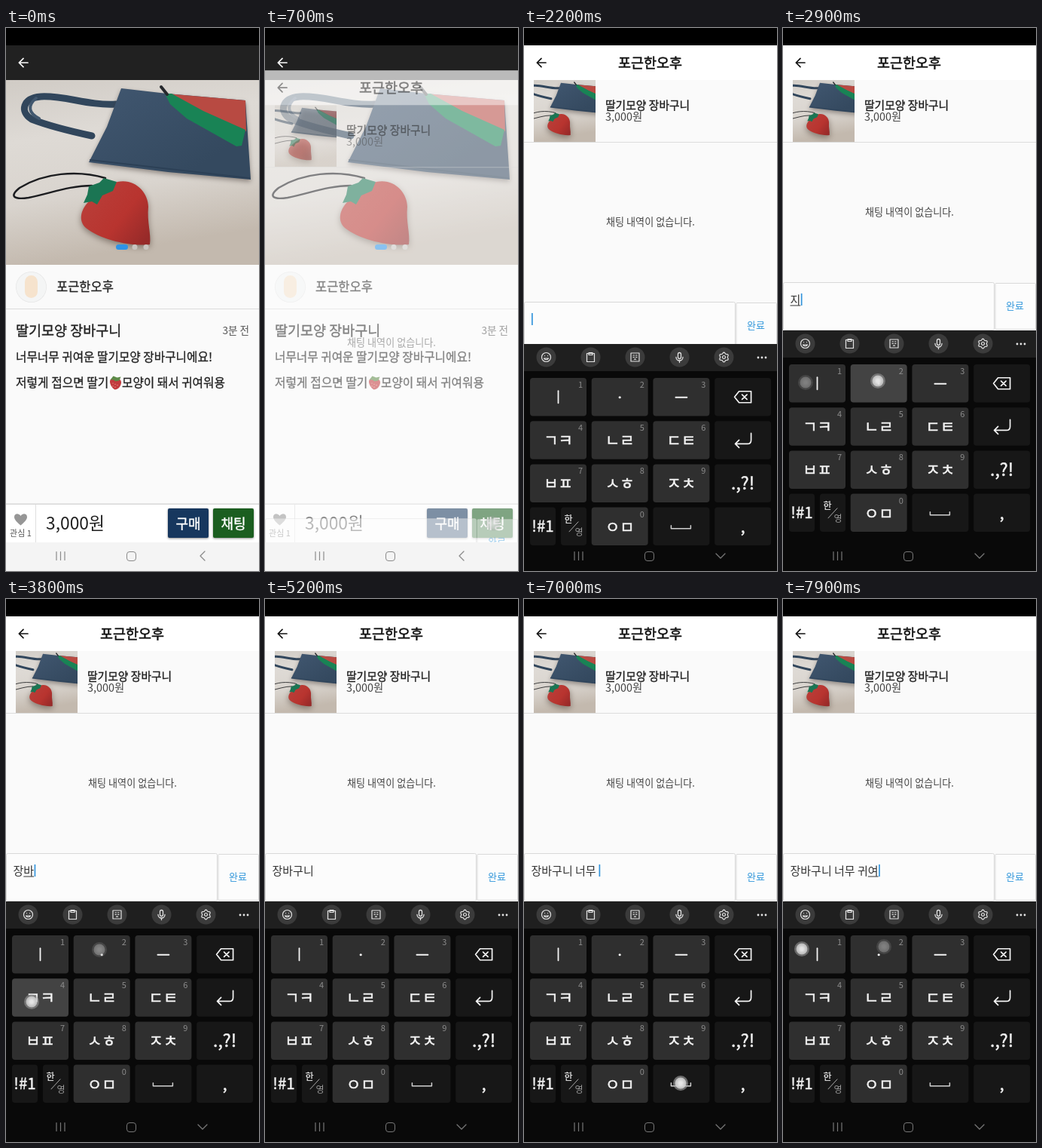
An HTML page with a canvas for the animation above (8 s loop, 336 by 720 pixels).

```html
<!DOCTYPE html>
<html lang="ko">
<head>
<meta charset="utf-8">
<title>장바구니 채팅</title>
<style>
html, body { margin: 0; width: 100%; height: 100%; overflow: hidden; background: #fafafa; }
canvas { display: block; width: 336px; height: 720px; }
</style>
</head>
<body>
<canvas id="stage"></canvas>
<script>
const W = 336, H = 720, LOOP = 8000;
const FONT = '"Noto Sans CJK KR", "Noto Sans CJK", "Noto Sans", sans-serif';
const SELLER = '포근한오후', ITEM = '딸기모양 장바구니', PRICE = '3,000원';
const canvas = document.getElementById('stage');
const ctx = canvas.getContext('2d');
const dpr = window.devicePixelRatio || 1;
canvas.width = W * dpr;
canvas.height = H * dpr;

// press time, x, y, text after the press ("|" starts the part being composed)
const TAPS = [
  [2480, 205, 590, '|ㅈ'],
  [2680, 30, 470, '|지'],
  [2880, 126, 468, '|자'],
  [3070, 130, 634, '|장'],
  [3260, 32, 588, '장|ㅂ'],
  [3430, 28, 470, '장|비'],
  [3590, 124, 465, '장|바'],
  [3770, 34, 534, '장|박'],
  [3980, 208, 472, '장바|그'],
  [4160, 128, 466, '장바|구'],
  [4320, 130, 530, '장바|군'],
  [4480, 28, 470, '장바구|니'],
  [4620, 208, 642, '장바구니|'],
  [5280, 208, 642, '장바구니 |'],
  [5500, 130, 530, '장바구니 |ㄴ'],
  [5730, 128, 466, '장바구니 |ㄴㆍ'],
  [5960, 25, 473, '장바구니 |너'],
  [6120, 134, 640, '장바구니 |넝'],
  [6300, 134, 640, '장바구니 |넘'],
  [6480, 208, 472, '장바구니 너|므'],
  [6640, 128, 466, '장바구니 너|무'],
  [6780, 208, 642, '장바구니 너무|'],
  [6900, 208, 642, '장바구니 너무 |'],
  [7020, 34, 532, '장바구니 너무 |ㄱ'],
  [7130, 208, 470, '장바구니 너무 |그'],
  [7240, 130, 464, '장바구니 너무 |구'],
  [7350, 26, 468, '장바구니 너무 |귀'],
  [7450, 132, 640, '장바구니 너무 |귕'],
  [7560, 134, 462, '장바구니 너무 귀|ㅇㆍ'],
  [7680, 134, 461, '장바구니 너무 귀|ㅇᆢ'],
  [7820, 25, 464, '장바구니 너무 귀|여']
];
const EDIT_LAG = 60;
const KEYS = ['ㅣ', 'ㆍ', 'ㅡ', 'del', 'ㄱㅋ', 'ㄴㄹ', 'ㄷㅌ', 'enter',
  'ㅂㅍ', 'ㅅㅎ', 'ㅈㅊ', '.,?!', 'mode', 'ㅇㅁ', 'space', ','];

const clamp = v => Math.max(0, Math.min(1, v));

function box(x, y, w, h, fill, r = 0, stroke) {
  ctx.beginPath();
  ctx.roundRect(x, y, w, h, r);
  if (fill) { ctx.fillStyle = fill; ctx.fill(); }
  if (stroke) { ctx.strokeStyle = stroke; ctx.lineWidth = 1; ctx.stroke(); }
}

function disc(x, y, r, fill) {
  ctx.beginPath();
  ctx.arc(x, y, r, 0, 7);
  ctx.fillStyle = fill;
  ctx.fill();
}

function shape(d, fill, stroke, width = 1) {
  const p = new Path2D(d);
  if (fill) { ctx.fillStyle = fill; ctx.fill(p); }
  if (stroke) {
    ctx.strokeStyle = stroke;
    ctx.lineWidth = width;
    ctx.lineCap = ctx.lineJoin = 'round';
    ctx.stroke(p);
  }
}

// Draws a shape whose path is given around (0, 0)
function icon(x, y, d, color, width = 1.5, fill) {
  ctx.save();
  ctx.translate(x, y);
  shape(d, fill, color, width);
  ctx.restore();
}

// y is the visual middle of the line, bold a thin outline for a medium weight
function text(s, x, y, size, color, bold = 0, align = 'left') {
  ctx.font = `400 ${size}px ${FONT}`;
  ctx.textAlign = align;
  ctx.fillStyle = color;
  ctx.fillText(s, x, y + size * 0.37);
  if (!bold) return;
  ctx.strokeStyle = color;
  ctx.lineWidth = bold;
  ctx.strokeText(s, x, y + size * 0.37);
}

function shadow(color, blur, y, paint) {
  ctx.save();
  ctx.shadowColor = color;
  ctx.shadowBlur = blur;
  ctx.shadowOffsetY = y;
  paint();
  ctx.restore();
}

function gradient(x0, y0, x1, y1, ...colors) {
  const g = ctx.createLinearGradient(x0, y0, x1, y1);
  colors.forEach((c, i) => g.addColorStop(i / (colors.length - 1), c));
  return g;
}

function backArrow(color) {
  icon(23, 46, 'M6 0H-5.5M0 -5.7L-5.7 0L0 5.7', color, 1.7);
}

function photo() {
  box(0, 0, W, 245, gradient(0, 0, 40, 245, '#d0cbc5', '#dedad5', '#d9d4ce', '#c3b9ae'));
  shape('M146 32C108 34 78 20 46 22C22 24 18 42 34 52C60 62 86 68 114 74', null, '#31465c', 9);
  shape('M40 24C28 34 30 44 44 51', null, '#42586f', 4);
  shadow('rgba(70,60,55,.5)', 6, 3, () =>
    shape('M153 11L214 18L318 27L325 132L215 122L110 109L134 62Z', gradient(150, 0, 230, 130, '#40566f', '#34495f')));
  shape('M112 106L323 130', null, '#2c4056', 2);
  shape('M213 18L318 27L319 68L262 42Z', '#b84a42');
  shape('M211 18L220 18L262 41L318 66L313 87L306 88L240 51L218 32Z', '#198355');
  shape('M206 9L214 19', null, '#25282c', 4);
  shape('M132 130C95 119 50 123 18 143C4 154 10 159 30 156C60 150 84 140 114 140', null, '#1c1d20', 2.5);
  shadow('rgba(70,55,45,.55)', 8, 3, () =>
    shape('M111 160C124 149 136 138 148 135C172 130 189 150 189 168C187 188 193 204 191 218C166 221 126 212 106 196C95 186 100 170 111 160Z',
      gradient(115, 160, 185, 215, '#b93c37', '#b8342f', '#962a29')));
  shape('M110 141L124 136L130 130L147 135L142 147L128 153L121 165L114 161L103 163L108 152Z', '#1b7553');
}

function button(x, label, color) {
  shadow('rgba(0,0,0,.45)', 3, 1, () => box(x, 637, 54, 39, color, 2));
  text(label, x + 27, 657, 18, '#fff', 0.4, 'center');
}

function itemPage() {
  box(0, 23, W, 659, '#fafafa');
  box(0, 23, W, 46, '#212121');
  backArrow('#fff');
  ctx.save();
  ctx.translate(0, 69);
  photo();
  ctx.restore();
  box(146, 287, 16, 7, '#2f93e6', 3.5);
  disc(171, 290.5, 3.5, '#c9c4c0');
  disc(186, 290.5, 3.5, '#c9c4c0');

  disc(33.5, 343.5, 20.5, '#e6e6e6');
  disc(33.5, 343.5, 19.8, '#f4f5f5');
  box(25, 328, 17, 30, '#f6e3cd', 8.5);
  text(SELLER, 67, 343, 16.5, '#222', 0.3);
  box(0, 372, W, 1, '#dcdcdc');
  text(ITEM, 13, 401, 18.5, '#222', 0.35);
  text('3분 전', 323, 401, 13.6, '#555', 0, 'right');
  text('너무너무 귀여운 딸기모양 장바구니에요!', 13, 436, 15.7, '#222', 0.3);
  text('저렇게 접으면 딸기', 13, 470.5, 15.8, '#222', 0.3);
  icon(145.5, 470.5, 'M-7 -4C-1 -9 8 -6 7.5 0C7 5 3 9 -1 9C-5 7 -9 0 -7 -4Z', null, 1, '#c23a3e');
  icon(145.5, 470.5, 'M-7 -4L-3 -9L2 -7L7 -8L5 -3L0 -2L-3 -4Z', null, 1, '#5d8a48');
  for (let i = 0; i < 5; i++) disc(142 + i % 3 * 3, 471 + i * 1.3, 0.6, '#f0b8a0');
  text('모양이 돼서 귀여워용', 154, 470.5, 15.7, '#222', 0.3);

  box(0, 631, W, 51, '#fff');
  box(0, 630.5, W, 1.5, '#d8d8d8');
  box(39, 632, 1, 50, '#dedede');
  icon(19.5, 652, 'M0 7.5C-5 3 -8.5 0 -8.5 -3.5C-8.5 -8.5 -2.5 -9 0 -5C2.5 -9 8.5 -8.5 8.5 -3.5C8.5 0 5 3 0 7.5Z', null, 1, '#969696');
  text('관심 1', 19.5, 670, 11, '#555', 0, 'center');
  text(PRICE, 53, 657, 22.8, '#222');
  button(215, '구매', '#17375e');
  button(275, '채팅', '#1b5e20');
}

function inputState(t) {
  let value = '|', edited = 2000;
  for (const [press, , , v] of TAPS) {
    if (t < press + EDIT_LAG) break;
    value = v;
    edited = press + EDIT_LAG;
  }
  const [done, composing] = value.split('|');
  return { done, composing, caret: t >= 2000 && (t - edited) % 1000 < 500 };
}

function chatPage(t, top) {
  box(0, 23, W, 697, '#fafafa');
  box(0, 23, W, 46, '#fff');
  backArrow('#111');
  text(SELLER, 167.5, 46, 18.5, '#111', 0.5, 'center');
  ctx.save();
  ctx.beginPath();
  ctx.rect(13, 69, 82, 82);
  ctx.clip();
  ctx.translate(-2.2, 69);
  ctx.scale(82 / 245, 82 / 245);
  photo();
  ctx.restore();
  text(ITEM, 108, 102.5, 14.8, '#222', 0.35);
  text(PRICE, 108, 117.5, 14.4, '#444');
  box(0, 151, W, 1, '#dcdcdc');
  text('채팅 내역이 없습니다.', 168, (151 + top) / 2, 13.1, '#444', 0, 'center');

  box(0.5, top + 0.5, 280, 63, '#fcfcfc', 2, '#d9d9d9');
  box(282, top + 1.5, 53.5, 61, '#fcfcfc', 1, '#d9d9d9');
  text('완료', 308, top + 31.5, 13, '#3498db', 0, 'center');

  const { done, composing, caret } = inputState(t);
  const y = top + 23;
  text(done + composing, 9.5, y, 15, '#333');
  const start = 9.5 + ctx.measureText(done).width;
  const end = 9.5 + ctx.measureText(done + composing).width;
  if (composing) box(start, y + 7.5, end - start, 1, '#333');
  if (caret) box(end + 0.5, y - 8, 1.7, 16, '#3595dc');
}

function navBar(dark) {
  if (!dark) box(0, 682, W, 38, '#f4f4f4');
  const c = dark ? '#777' : '#8a8a8a';
  icon(72.5, 700, 'M-5.5 -5.5V5.5M0 -5.5V5.5M5.5 -5.5V5.5', c, 1.2);
  box(160.5, 694.5, 12, 12, null, 3.5, c);
  icon(261, 700, dark ? 'M-6 -3L0 3L6 -3' : 'M3 -6L-3 0L3 6', c, 1.3);
}

function toolbar(kb) {
  box(0, kb, W, 36, '#1f1f1f');
  const y = kb + 17.5, c = '#e4e4e4';
  for (let i = 0; i < 5; i++) disc(29.5 + i * 59, y, 13, '#3b3b3b');
  icon(29.5, y, 'M6 0A6 6 0 1 1 -6 0A6 6 0 1 1 6 0M-3 1.5Q0 5 3 1.5ZM-2 -2V-1.8M2 -2V-1.8', c, 1.2);
  icon(88.5, y, 'M-5 -5H5V6H-5ZM-2.5 -6H2.5V-3H-2.5Z', c, 1.2);
  icon(147.5, y, 'M-5.5 -5.5H5.5V5.5H-5.5ZM-2.5 -2.5H-1M1 -2.5H2.5M-2.5 0H-1M1 0H2.5M-1 2.7H1', c, 1.2);
  icon(206.5, y, 'M-2 -4A2 2 0 0 1 2 -4V0A2 2 0 0 1 -2 0ZM-4.5 0A4.5 4.5 0 0 0 4.5 0M0 4.5V7', c, 1.3);
  let gear = '';
  for (let i = 0; i <= 48; i++) {
    const a = i * Math.PI / 24, r = 5.6 + 0.8 * Math.cos(a * 6);
    gear += `${i ? 'L' : 'M'}${r * Math.sin(a)} ${r * Math.cos(a)}`;
  }
  icon(265.5, y, gear + 'M2 0A2 2 0 1 1 -2 0A2 2 0 1 1 2 0', c, 1.2);
  for (const x of [311, 316, 321]) disc(x, y + 0.5, 1.4, c);
}

function keyLabel(k, x, y) {
  const c = '#f4f4f4';
  if (k === 'ㅣ') icon(x, y, 'M0 -8V8', c, 1.8);
  else if (k === 'ㆍ') disc(x, y + 0.5, 1.6, c);
  else if (k === 'ㅡ') icon(x, y + 0.5, 'M-7.5 0H7.5', c, 1.8);
  else if (k === 'del') icon(x, y, 'M-11 0L-5 -7.5H11V7.5H-5ZM-1 -3.2L5.5 3.2M5.5 -3.2L-1 3.2', c, 1.7);
  else if (k === 'enter') icon(x, y, 'M11 -9V0Q11 5 6 5H-10M-5 0L-10 5L-5 10', c, 1.7);
  else if (k === 'space') icon(x - 0.5, y, 'M-13 -1V3H13V-1', '#d0d0d0', 1.5);
  else text(k, x, y, k.length > 2 ? 23 : 21, c, 0.5, 'center');
}

function keyboard(t, kb) {
  box(0, kb, W, H - kb, '#090909');
  toolbar(kb);
  const hit = TAPS.find(([press]) => t >= press && t < press + EDIT_LAG);
  const shift = kb - 401;
  KEYS.forEach((k, i) => {
    const col = i % 4, row = i >> 2;
    const x = 8 + col * 81.7, y = kb + 45 + row * 57.2, w = 75, h = 50.5;
    const cx = x + w / 2, cy = y + h / 2;
    if (k === 'mode') {
      box(x, y, 34, h, '#171717', 4);
      box(x + 41, y, 34, h, '#171717', 4);
      text('!#1', x + 17, cy, 20.5, '#f4f4f4', 0.4, 'center');
      text('한', x + 51, cy - 9, 12, '#f4f4f4', 0.2, 'center');
      icon(x + 58, cy, 'M6 -6L-6 7', '#aaa', 1);
      text('영', x + 65, cy + 8, 12, '#999', 0, 'center');
      return;
    }
    const pressed = hit && Math.abs(hit[1] - cx) < w / 2 && Math.abs(hit[2] + shift - cy) < h / 2;
    const letter = col < 3 && k !== 'space';
    box(x, y, w, h, pressed ? '#434343' : letter ? '#2f2f2f' : '#171717', 4);
    keyLabel(k, cx, cy);
    if (letter) text(String(row < 3 ? row * 3 + col + 1 : 0), x + 67, y + 9, 11, '#8c8c8c', 0, 'center');
  });
}

function touch(t, press, x, y) {
  const age = t - press;
  if (age < 0 || age > 320) return;
  ctx.globalAlpha = age < 110 ? 1 : 0.8 * (1 - (age - 110) / 210);
  disc(x, y, 10, 'rgba(165,165,165,.5)');
  const g = ctx.createRadialGradient(x, y, 2, x, y, 8);
  g.addColorStop(0, 'rgba(240,240,240,.9)');
  g.addColorStop(1, 'rgba(205,205,205,.75)');
  disc(x, y, 7.5, g);
  ctx.globalAlpha = 1;
}

function draw(t) {
  ctx.setTransform(dpr, 0, 0, dpr, 0, 0);
  box(0, 0, W, H, '#fafafa');
  const enter = clamp((t - 640) / 340);
  const open = t > 1945;
  const slide = Math.round(319 * (1 - clamp((t - 1945) / 335)) ** 2);
  const top = 337 + Math.min(280, Math.round(slide * 1.43));

  if (enter < 1) itemPage();
  if (enter > 0) {
    const e = 1 - (1 - enter) ** 3;
    ctx.save();
    ctx.globalAlpha = e;
    ctx.translate(0, 60 * (1 - e));
    chatPage(t, top);
    ctx.restore();
  }
  if (open) keyboard(t, 401 + slide);
  navBar(open);
  box(0, 0, W, 23, '#000');
  touch(t, 510, 303, 657);
  touch(t, 1860, 140, 650);
  for (const [press, x, y] of TAPS) touch(t, press, x, y);
}

function tick() {
  draw(performance.now() % LOOP);
  requestAnimationFrame(tick);
}
tick();
</script>
</body>
</html>
```
